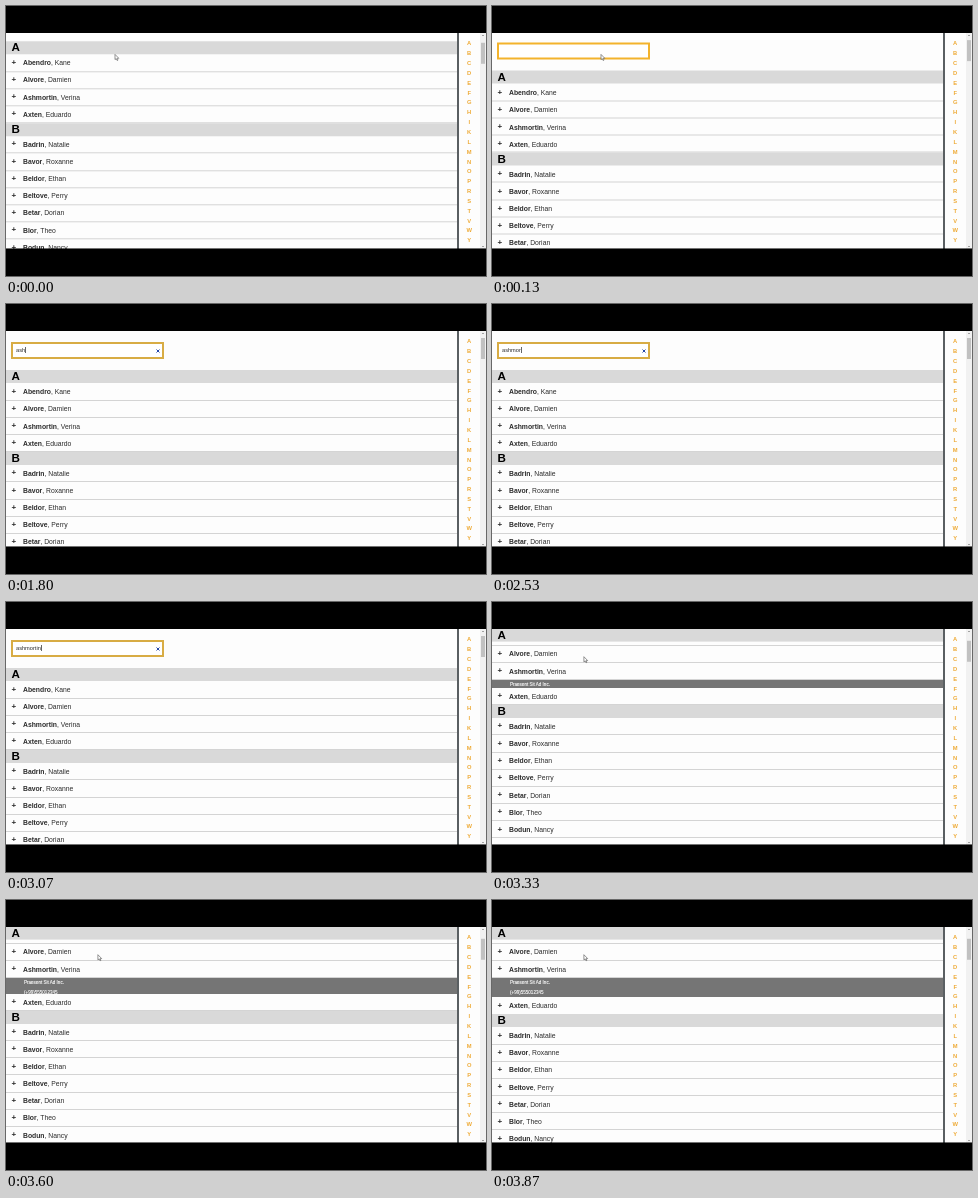
An HTML page that plays this animation: 480x270 px, repeating every 3.94 s.

```html
<!DOCTYPE html>
<html lang="en">
<head>
<meta charset="utf-8">
<title>Contact list search</title>
<style>
  html, body { margin: 0; width: 100%; height: 100%; overflow: hidden; background: #000; }
  body { position: relative; font-family: "Liberation Sans", Arial, sans-serif; color: #2c2c2c; }
  div, span, svg { position: absolute; box-sizing: border-box; white-space: pre; }
  #view { left: 0; top: 27px; width: 480px; height: 216px; overflow: hidden; background: #fdfdfd; }
  #view::after { content: ""; position: absolute; left: 0; bottom: 0; width: 100%; height: 1px; background: rgba(0, 0, 0, .55); }
  #page { left: 0; top: 0; width: 451px; height: 400px; }
  #list { left: 0; top: 39.4px; width: 100%; }
  #list > div { position: relative; width: 100%; }
  #list .head { height: 12.8px; background: #d9d9d9; color: #000; font: bold 11.6px/12px "Liberation Sans", Arial, sans-serif; padding-left: 5.5px; z-index: 2; }
  .row { height: 17.2px; font-size: 6.8px; line-height: 17.2px; padding-left: 17px; }
  .row::before { content: "+"; position: absolute; left: 5.6px; top: -.3px; font-weight: bold; font-size: 8px; }
  .row::after { content: ""; position: absolute; left: 0; bottom: -.4px; width: 100%; height: 1px; background: #d4d4d4; }
  #panel { overflow: hidden; background: #757575; color: #fff; font-size: 4.55px; line-height: 10px; -webkit-text-stroke: .12px #fff; }
  #panel span { left: 18px; }
  #box { left: 5.3px; top: 11.2px; width: 152.4px; height: 16.8px; border: 2px solid #f3b32c; background: #fff; }
  #box.focus { border-color: #d8ac44; }
  #typed { left: 2.7px; top: 0; font-size: 5.67px; line-height: 12.4px; }
  #caret { position: static; display: inline-block; width: 1px; height: 6.4px; background: #666; vertical-align: -1.3px; }
  #clear { left: 143.2px; top: 4.5px; width: 4px; height: 4px; }
  #side { left: 451px; top: 0; width: 23px; height: 100%; border-left: 2px solid #5a5f62; background: #fdfdfd; }
  #side span { left: 0; width: 20.4px; text-align: center; color: #eeaa35; font-weight: bold; font-size: 5.8px; line-height: 8px; }
  #bar { left: 474px; top: 0; width: 6px; height: 100%; background: #f1f1f1; }
  #thumb { left: .8px; top: 6.5px; width: 4.2px; height: 21px; background: #c1c1c1; }
  .tip { left: 1.5px; border: 1.5px solid transparent; }
  .up { top: .8px; border-bottom-color: #555; }
  .down { bottom: 1.4px; border-top-color: #555; }
  #arrow, #beam { left: 0; top: 0; width: 8px; height: 9px; overflow: visible; }
</style>
</head>
<body>
<div id="view">
  <div id="page">
    <div id="box">
      <div id="typed"><span id="word" style="position:static"></span><span id="caret"></span></div>
      <svg id="clear" viewBox="0 0 4 4"><path d="M.5 .5L3.5 3.5M3.5 .5L.5 3.5" stroke="#2446a8" stroke-width="1"/></svg>
    </div>
    <div id="list"></div>
  </div>
  <div id="side"></div>
  <div id="bar"><div class="tip up"></div><div id="thumb"></div><div class="tip down"></div></div>
</div>
<svg id="arrow" viewBox="0 0 8 9"><path d="M.4 .4V5.6L1.6 4.6L2.5 6.5L3.4 6.1L2.6 4.3H4.2Z" fill="#fff" stroke="#666" stroke-width=".7"/></svg>
<svg id="beam" viewBox="0 0 8 9"><path d="M0 0H2M1 0V6M0 6H2" fill="none" stroke="#777" stroke-width=".6"/></svg>
<script>
const $ = id => document.getElementById(id);
const LOOP = 3940, STEP = 200 / 3;
const QUERY = "ashmortin";
const KEYS = [1400, 1670, 1800, 2070, 2330, 2530, 2600, 2800, 2930];
const FOCUS = 930, JUMP = 3200, PANEL = 19.4;
const OPENING = [30.7, 12, 1.5];

const groups = {
  A: ["Abendro, Kane", "Alvore, Damien", "Ashmortin, Verina", "Axten, Eduardo"],
  B: ["Badrin, Natalie", "Bavor, Roxanne", "Beldor, Ethan", "Beltove, Perry",
      "Betar, Dorian", "Blor, Theo", "Bodun, Nancy"]
};

function add(parent, tag, props) {
  const el = Object.assign(document.createElement(tag), props);
  parent.append(el);
  return el;
}

const list = $("list");
for (const [letter, names] of Object.entries(groups)) {
  add(list, "div", { className: "head", textContent: letter });
  for (const name of names) {
    const [last, first] = name.split(", ");
    add(list, "div", { className: "row", innerHTML: `<b>${last}</b>, ${first}` });
    if (last.toLowerCase() === QUERY) add(list, "div", { id: "panel" });
  }
}
["Praesent Sit Ad Inc.", "(+99)555012345"].forEach((text, i) => {
  add($("panel"), "span", { textContent: text }).style.top = i * 9.9 + .3 + "px";
});
[..."ABCDEFGHIKLMNOPRSTVWY"].forEach((c, i) => {
  add($("side"), "span", { textContent: c }).style.top = 6.3 + i * 9.85 + "px";
});

const firstHead = list.firstElementChild;
const clamp = x => Math.max(0, Math.min(1, x));
const show = (el, on) => el.style.visibility = on ? "visible" : "hidden";
const move = (el, x, y) => el.style.transform = `translate(${x}px, ${y}px)`;

function draw(time) {
  const n = Math.floor((time % LOOP + 4) / STEP);
  const t = n * STEP + 4;

  const scroll = t >= JUMP ? 53 : OPENING[n] || 0;
  move($("page"), 0, -scroll);
  move(firstHead, 0, Math.max(0, scroll - 39.4));
  move($("thumb"), 0, scroll * .09);

  const left = 1 - clamp((t - 3150) / 800);
  $("panel").style.height = (t >= JUMP ? PANEL * (1 - left * left) : 0) + "px";

  const count = KEYS.filter(k => t >= k).length;
  $("word").textContent = QUERY.slice(0, count);
  $("box").className = t >= FOCUS ? "focus" : "";
  show($("caret"), t >= FOCUS);
  show($("clear"), count > 0);

  // The pointer turns into a text beam over the field and hides while typing.
  const go = clamp((t - 335) / 535);
  const glide = go * go * (3 - 2 * go);
  show($("arrow"), t < 400 || t >= JUMP);
  show($("beam"), t >= 400 && t < KEYS[0]);
  if (t >= JUMP) move($("arrow"), 91.5, 54.3);
  else move($("arrow"), 108.6, 48);
  move($("beam"), 108.6 - 16 * glide, 46 + 5 * glide);
}

const start = performance.now();
function tick() {
  draw(performance.now() - start);
  requestAnimationFrame(tick);
}
tick();
</script>
</body>
</html>
```
